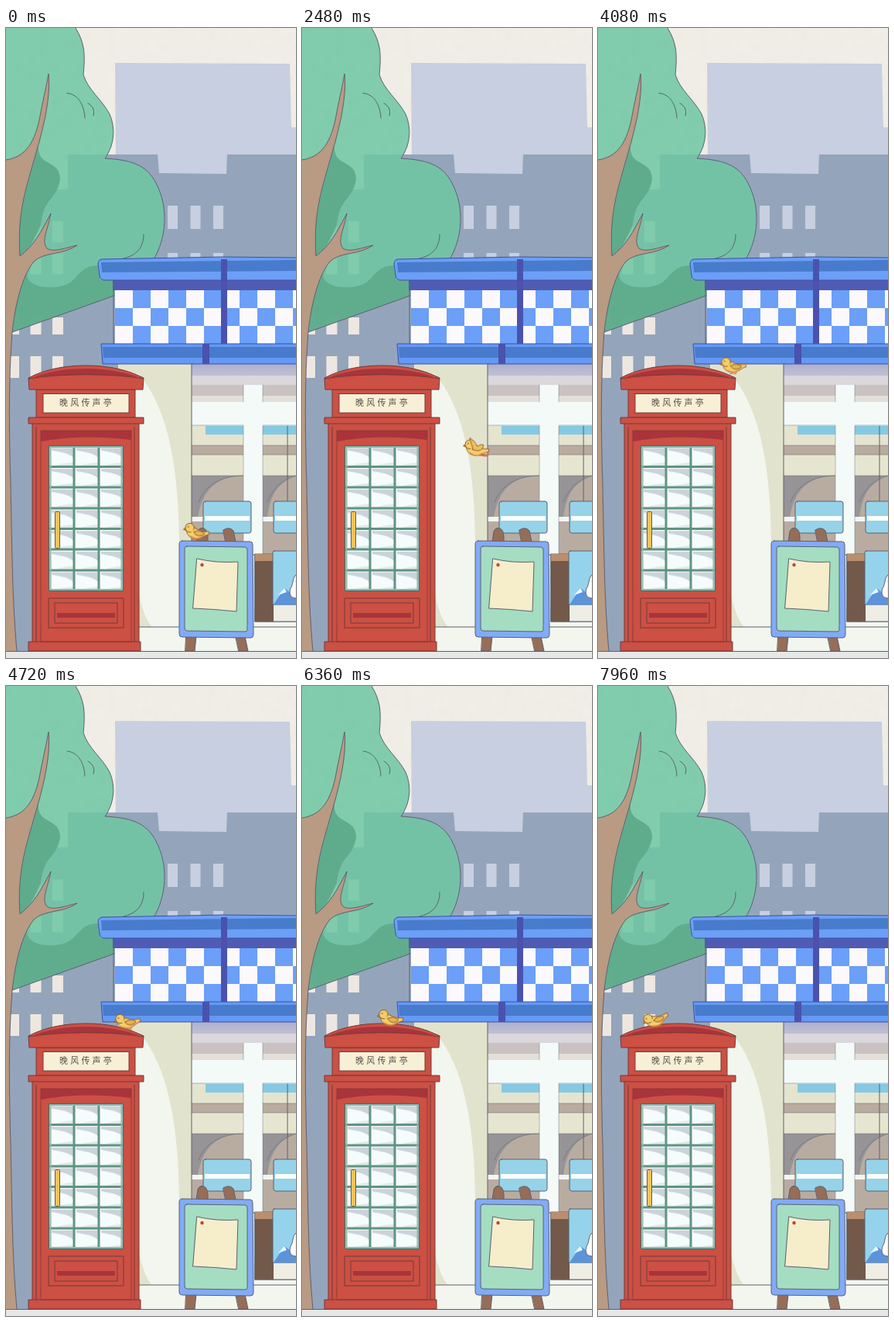
Recreate the animation shown at these times as an HTML page. Size 375 px wide and 812 px high, loop 8 s.

```html
<!DOCTYPE html>
<html lang="zh">
<head>
<meta charset="utf-8">
<title>Street corner</title>
<style>
html, body { margin: 0; width: 100%; height: 100%; overflow: hidden; background: #f0eee7; }
svg { display: block; width: 100vw; height: 100vh; }
.ink { stroke: #5d6070; stroke-width: 1; stroke-linejoin: round; stroke-linecap: round; }
.red { fill: #cc5043; stroke: #713b3c; stroke-width: 1; stroke-linejoin: round; }
.dark { fill: #a9343b; }
.line { fill: none; }
.sign { font: 11px "Noto Sans CJK SC", "Noto Sans CJK", sans-serif; letter-spacing: 3.2px; fill: #55504a; }

.bird { animation: travel 8s linear infinite; }
.pose { animation: tilt 8s ease-in-out infinite; }
.head { animation: nod 8s ease-in-out infinite; }
.flight { animation: fly 8s step-end infinite; }
.ground { animation: stand 8s step-end infinite; }
.wing { transform-origin: 1px 0; animation: flap calc(8s / 26) ease-in-out infinite; }

@keyframes travel {
  0% { transform: translate(246px, 650px); }
  15% { transform: translate(246px, 650px); animation-timing-function: cubic-bezier(.333, 0, .667, .333); }
  19.5% { transform: translate(243px, 633px); }
  31% { transform: translate(225px, 543px); }
  42.5% { transform: translate(200px, 454px); }
  45% { transform: translate(193px, 438px); }
  52.5% { transform: translate(170px, 435px); }
  59% { transform: translate(157px, 433px); }
  79.5% { transform: translate(114px, 429px); }
  99.5% { transform: translate(75px, 430px); }
  100% { transform: translate(74px, 430px); }
}
@keyframes tilt {
  0%, 15% { transform: rotate(6deg); }
  19.5% { transform: rotate(-3deg); }
  31% { transform: rotate(8deg); }
  42.5% { transform: rotate(5deg); }
  52.5% { transform: rotate(0deg); }
  59% { transform: rotate(-6deg); }
  65% { transform: rotate(4deg); }
  72.5% { transform: rotate(-6deg); }
  79.5% { transform: rotate(5deg); }
  86% { transform: rotate(-6deg); }
  92.5% { transform: rotate(2deg); }
  99.5%, 100% { transform: rotate(-23deg); }
}
@keyframes nod {
  0%, 1.5%, 5.5%, 100% { transform: none; }
  3.5% { transform: translateY(1px); }
}
@keyframes fly { 0% { opacity: 0; } 16% { opacity: 1; } 51% { opacity: 0; } }
@keyframes stand { 0% { opacity: 1; } 16% { opacity: 0; } 51% { opacity: 1; } }
@keyframes flap { 0%, 100% { transform: none; } 50% { transform: scaleY(-.6); } }
</style>
</head>
<body>
<svg viewBox="0 0 375 812" preserveAspectRatio="none">
  <defs>
    <filter id="grain" x="0" y="0" width="1" height="1">
      <feTurbulence type="fractalNoise" baseFrequency=".07" numOctaves="2" seed="4"/>
      <feColorMatrix values="0 0 0 0 .8  0 0 0 0 .77  0 0 0 0 .7  .45 0 0 0 -.12"/>
    </filter>
    <pattern id="check" x="141" y="338" width="46" height="46" patternUnits="userSpaceOnUse">
      <rect width="46" height="46" fill="#fcf9fd"/>
      <path d="M23 0h23v23H23zM0 23h23v23H0z" fill="#6b9ff8"/>
    </pattern>
    <pattern id="pane" x="56" y="538.5" width="32" height="26.7" patternUnits="userSpaceOnUse">
      <rect width="32" height="26.7" fill="#f6fcfc"/>
      <path d="M3 3H31V15C24 9 14 8 3 6z" fill="#cbd3da"/>
      <path d="M10 25C18 22 25 23 31 21V26H10z" fill="#dfe9e8"/>
    </pattern>
    <linearGradient id="lintel" x2="0" y2="1">
      <stop stop-color="#aeb0cf"/><stop offset="1" stop-color="#c0bfd2"/>
    </linearGradient>
  </defs>

  <!-- sky and city -->
  <rect width="375" height="812" fill="#f0eee7"/>
  <rect width="375" height="170" filter="url(#grain)"/>
  <path d="M141 45L367 46L369 128H375V190H142z" fill="#c7cfe0"/>
  <path d="M80 163H196L198 187L285 188L286 163H375V440H145V803H0V208H80z" fill="#94a5bb"/>
  <g fill="none" stroke="#c7cfe0">
    <path d="M209 244H282" stroke-width="30" stroke-dasharray="13 16.5"/>
    <path d="M209 294H282" stroke-width="8" stroke-dasharray="13 16.5"/>
  </g>
  <g fill="none" stroke="#eee7e1">
    <path d="M3 263H76M3 304H76" stroke-width="27" stroke-dasharray="14 14.5"/>
    <path d="M3 384H76" stroke-width="22" stroke-dasharray="14 14.5"/>
    <path d="M3 437H76" stroke-width="28" stroke-dasharray="14 14.5"/>
  </g>

  <!-- tree -->
  <path d="M0 0H90C101 18 103 32 100 60C106 80 124 92 134 111C142 130 140 151 128 168C160 170 181 175 194 200C211 232 207 272 191 298H140V345L8 392L0 390z" fill="#70c7a4" opacity=".87"/>
  <path d="M42 150C39 180 70 168 70 195C66 222 49 217 45 254C36 274 29 286 18 295C13 245 27 205 42 150z" fill="#5fac8d"/>
  <path d="M8 392C12 360 17 334 28 313C23 331 48 337 70 333C94 329 92 306 119 306L122 325H140V345z" fill="#5fac8d" opacity=".92"/>
  <path d="M0 170C31 166 40 137 45 108C49 88 52 76 55 59C58 88 49 125 42 150C27 204 14 235 18 294C36 280 45 264 58 239C55 257 45 275 53 284C61 290 78 283 92 280C73 293 50 288 36 301C20 321 12 357 8 392C3 455 4 520 6 590C8 680 8 735 14 803H0z" fill="#b99a83"/>
  <g class="ink line">
    <path d="M90 0C101 18 103 32 100 60C106 80 124 92 134 111C142 130 140 151 128 168C160 170 181 175 194 200C211 232 207 272 191 298M140 345L8 392"/>
    <path d="M0 170C31 166 40 137 45 108C49 88 52 76 55 59C58 88 49 125 42 150C27 204 14 235 18 294C36 280 45 264 58 239C55 257 45 275 53 284C61 290 78 283 92 280C73 293 50 288 36 301C20 321 12 357 8 392C3 455 4 520 6 590C8 680 8 735 14 803"/>
    <path d="M79 84C92 85 101 97 102 116M106 97C113 101 115 107 113 113M178 266C178 283 169 293 152 297"/>
  </g>

  <!-- shop wall -->
  <path d="M145 433H375V803H145z" fill="#f2f6ee"/>
  <path d="M145 433H240V662H224C223 570 211 492 172 446L145 441z" fill="#e2e3cd"/>
  <path d="M172 733C178 752 181 764 189 772H172z" fill="#e2e3cd"/>

  <!-- shop window -->
  <g>
    <rect x="240" y="433" width="135" height="15" fill="url(#lintel)"/>
    <rect x="240" y="448" width="135" height="12" fill="#dad7dd"/>
    <rect x="240" y="460" width="135" height="14" fill="#c9c2c0"/>
    <rect x="240" y="474" width="135" height="8" fill="#e2dfd9"/>
    <rect x="240" y="512" width="135" height="26" fill="#e4e4cf"/>
    <rect x="258" y="513" width="117" height="11" fill="#85c9e3"/>
    <rect x="240" y="538" width="135" height="12" fill="#b9ab9e"/>
    <rect x="240" y="550" width="135" height="27" fill="#e6e6d0"/>
    <rect x="240" y="577" width="135" height="103" fill="#b8aca1"/>
    <path d="M240 577H307C278 577 254 591 248 631H240zM332 577H375C352 585 341 603 338 631H332z" fill="#969496"/>
    <path d="M240 577H307C280 577 258 588 249 611M332 577H375C355 583 344 595 338 611M240 538H375M240 550H375" class="ink line" opacity=".5"/>
    <rect x="240" y="630" width="135" height="6" fill="#f3f5f2"/>
    <path d="M240 482H307V460H332V482H375V512H332V678H307V512H240z" fill="#f4faf8"/>
    <path d="M307 460V482M332 460V482M240 512H307V660M375 512H332V678" class="ink line" opacity=".4"/>
    <path d="M240 433V662M364 513V610" class="ink line"/>
  </g>
  <path d="M322 678H375V765H322z" fill="#73594a" class="ink"/>
  <path d="M322 678H347V687H322z" fill="#b98f70"/>
  <g class="ink">
    <rect x="255" y="610" width="62" height="41" rx="3" fill="#96d2e8"/>
    <rect x="346" y="610" width="40" height="41" rx="3" fill="#96d2e8"/>
    <rect x="345" y="674" width="40" height="70" rx="2" fill="#94d3eb"/>
  </g>
  <path d="M257 629H315V635H257zM348 629H375V635H348z" fill="#fbfdfd"/>
  <path d="M346 743L360 722L375 733V743z" fill="#5d93db"/>
  <path d="M352 731L360 722L363 727z" fill="#f3fafc"/>
  <path d="M375 705C370 708 372 717 368 722C365 731 369 735 375 735z" fill="#fdfdfd" class="ink"/>
  <path d="M346 744H375V765H346z" fill="#eeeee4"/>
  <path d="M322 765H375M172 772H375" class="ink line"/>

  <!-- awning -->
  <path d="M138 325H375V338H138z" fill="#505cb3"/>
  <path d="M141 338H375V407H141z" fill="url(#check)"/>
  <path d="M139 325V407" class="ink line"/>
  <g stroke="#3e509c" stroke-linejoin="round">
    <path d="M124 298L280 295L376 296V325H127Q122 325 121 319L119 304Q119 299 124 298z" fill="#6b9ff8"/>
    <path d="M123 407H376V433H125z" fill="#6499f6"/>
  </g>
  <path d="M123 302L375 299V313L124 315zM125 411H375V425H126z" fill="#487bcb"/>
  <path d="M278 298H286V407H278zM254 407H263V433H254z" fill="#4a52ae"/>

  <!-- ground -->
  <rect y="803" width="375" height="9" fill="#e5e8e7"/>
  <path d="M0 803.5H375" class="ink line"/>

  <!-- easel -->
  <g class="ink">
    <g fill="#966d56">
      <path d="M246 662L248 649Q250 643 256 645Q262 647 261 662zM281 647Q289 642 294 648L297 662H284z"/>
      <path d="M233 784H246L244 803H232zM297 784H309L313 803H301z"/>
    </g>
    <path d="M228 661L316 662Q319 662 319 666L320 782Q320 786 316 786L228 785Q224 785 224 781V665Q224 661 228 661z" fill="#82abf6"/>
    <path d="M234 668L309 669Q312 669 312 673V775Q312 778 309 778L234 777Q231 777 231 773V671Q231 668 234 668z" fill="#a4ddc2"/>
    <path d="M247 684Q272 690 300 688L298 752Q270 749 242 748z" fill="#f6edcb"/>
  </g>
  <circle cx="253.500" cy="692" r="2.200" fill="#b9483c"/>

  <!-- phone booth -->
  <g class="red">
    <path d="M34 509H172V793H34z"/>
    <path d="M29 791H174V803H29z"/>
    <path d="M39 466H167V502H39z"/>
    <path d="M29 502H178V510H29z"/>
    <path d="M29 451C52 439 78 435 104 435C131 435 156 440 178 451L177 466H30z"/>
  </g>
  <path d="M36 450C56 442 80 439 104 439C129 439 151 443 171 450C128 446 80 446 36 450z" class="dark"/>
  <path d="M29 452C72 445 136 445 178 452M39 514V791M166 514V791" fill="none" stroke="#713b3c"/>
  <path d="M45 519H162V531C125 526 84 526 45 533z" class="dark"/>
  <rect x="45" y="519" width="117" height="272" fill="none" stroke="#8d3a3b"/>
  <rect x="48" y="471.500" width="111" height="24.500" fill="#f8f0d6" stroke="#713b3c"/>
  <text class="sign" x="69" y="487">晚风传声亭</text>
  <rect x="55.500" y="538.500" width="96" height="187" rx="2" fill="url(#pane)" stroke="#4c6c64" stroke-width="1.500"/>
  <path d="M88 539V725M120 539V725M56 565.500H151M56 592H151M56 619H151M56 645.500H151M56 672H151M56 699H151" fill="none" stroke="#5f9483" stroke-width="3"/>
  <path d="M57.500 540H149.500V724H57.500z" fill="none" stroke="#8eb8aa" stroke-width="2"/>
  <rect x="63.500" y="623.500" width="6" height="47" rx="1" fill="#f0c356" stroke="#6d5a3c"/>
  <g class="red">
    <rect x="55" y="735" width="97" height="38"/>
    <rect x="63" y="741" width="81" height="26"/>
  </g>
  <path d="M66 754H141V760H66z" class="dark"/>

  <!-- bird -->
  <g class="bird"><g class="pose" stroke="#8a5b35" stroke-linejoin="round" stroke-linecap="round" stroke-width="1">
    <path class="ground" d="M-1 6V10H-4M4 6V10H1" fill="none" stroke="#a8613c"/>
    <g class="flight" fill="none" stroke="#d0663f" stroke-width="1.500"><path d="M3 6L17 5M4 7L15 7"/></g>
    <path d="M-13 -1C-11 7 -4 9 2 8C8 7 10 3 17 1L16 -3C10 -1 6 -2 1 -4L-5 -7z" fill="#f4ce67"/>
    <path d="M-7 6C-1 9 5 8 9 4" fill="none" stroke="#e08f4b" stroke-width="1.500"/>
    <g class="head">
      <path d="M-14 -5L-17 -2L-13 -1z" fill="#e38a45"/>
      <circle cx="-9" cy="-5" r="5.700" fill="#f4ce67"/>
      <path d="M-12 -4C-8 0 -5 0 -3 -2" fill="none" stroke="#f4ce67" stroke-width="2"/>
      <circle cx="-11" cy="-6" r=".8" fill="#4d3a2c" stroke="none"/>
    </g>
    <path class="ground" d="M-3 0C3 -4 8 -2 11 1C7 5 0 6 -3 0z" fill="#e7b452"/>
    <g class="flight"><path class="wing" d="M-4 1C-5 -5 -9 -9 -10 -14C-4 -11 -1 -8 1 -4C4 -7 7 -8 9 -7C9 -1 5 4 -4 1z" fill="#eec05a"/></g>
  </g></g>
</svg>
</body>
</html>
```
